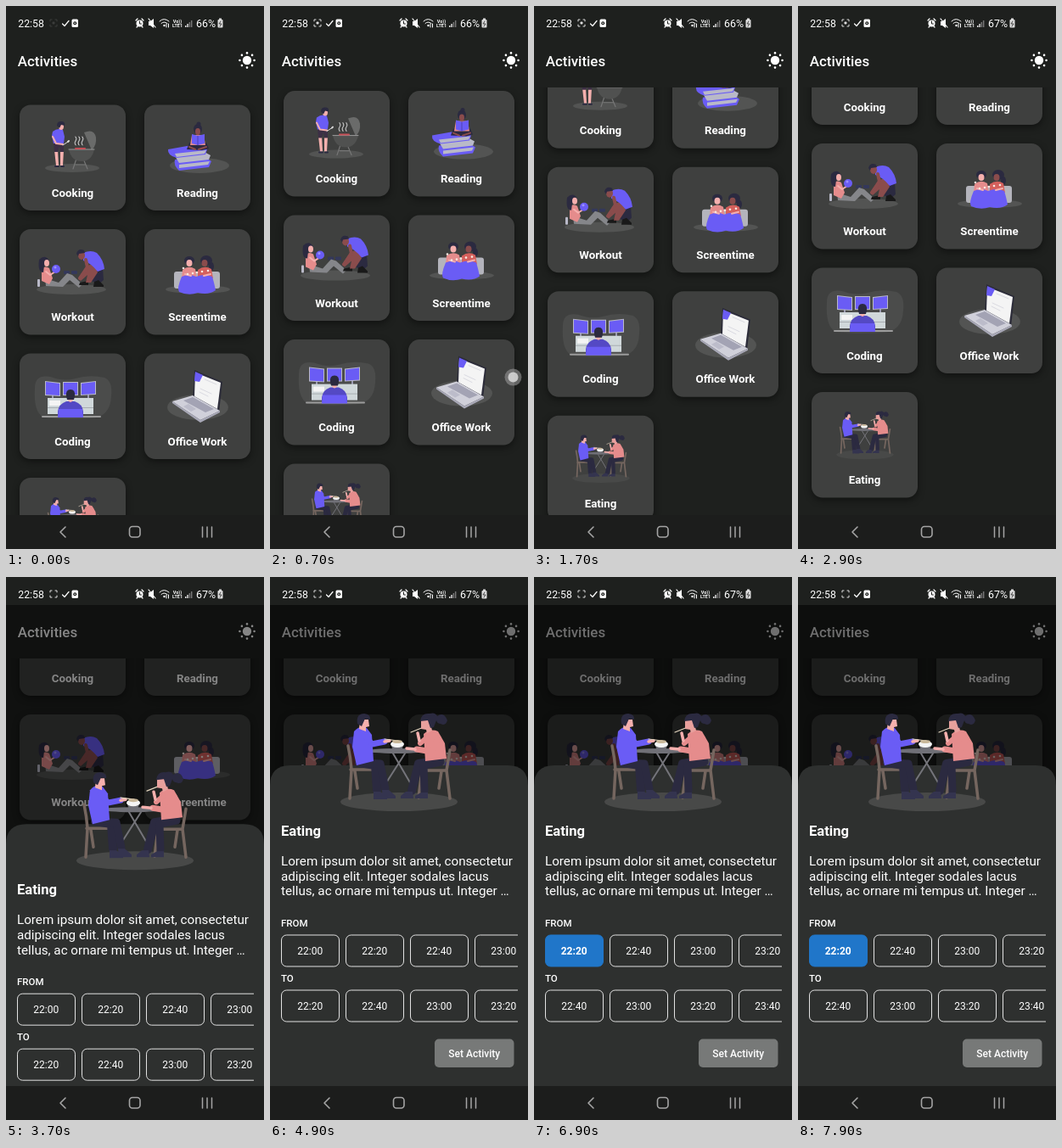
Animation of 304x640 px, one loop 8000 ms. Source, as an HTML page:

```html
<!DOCTYPE html>
<html lang="en">
<head>
<meta charset="utf-8">
<title>Activities</title>
<style>
html, body { margin: 0; width: 100%; height: 100%; overflow: hidden; background: #1e201e; }
svg { display: block; width: 100vw; height: 100vh; font-family: Roboto, sans-serif; }
.card { fill: #3f403f; filter: drop-shadow(0 3px 4px rgba(0,0,0,.45)); }
</style>
</head>
<body>
<svg id="stage" viewBox="0 0 304 640"></svg>
<script>
const BLUE = '#6a5cf5', DARK = '#2b2a40', PINK = '#e58c8c', SKIN = '#f5b0ae', BROWN = '#8a4c4c',
  GREY = '#535453', PALE = '#b9b9c8', WHITE = '#f4f4f4';

// Shape helpers
const fill = (c, d) => `<path fill="${c}" d="${d}"/>`;
const line = (c, w, d) => `<path fill="none" stroke="${c}" stroke-width="${w}" stroke-linecap="round" stroke-linejoin="round" d="${d}"/>`;
const oval = (c, x, y, rx, ry = rx) => `<ellipse fill="${c}" cx="${x}" cy="${y}" rx="${rx}" ry="${ry}"/>`;
const box = (c, x, y, w, h, r = 0, more = '') => `<rect fill="${c}" x="${x}" y="${y}" width="${w}" height="${h}" rx="${r}" ${more}/>`;
const text = (s, x, y, size, weight = 400, more = '') =>
  `<text x="${x}" y="${y}" font-size="${size}" font-weight="${weight}" fill="#fff" ${more}>${s}</text>`;
const mid = 'text-anchor="middle"';

const cooking = oval(GREY, 78, 191, 32, 5)
  + fill(SKIN, 'M57 170h4l1 18h-3zM64 170h4l-1 18h-3z') + line(DARK, 2, 'M58 189h4M65 189h3')
  + fill('#3c2f45', 'M56 160h12v12h-4l-1-7-2 7h-4z')
  + fill(BLUE, 'M55 148q6-5 12-2l2 8-1 8H56l-2-9z')
  + line(SKIN, 2, 'M55 154l4 8 8 1') + line('#ddd', 1, 'M67 164l6-4') + line('#ddd', 2, 'M73 160l1-1')
  + oval(SKIN, 65, 142, 3, 4) + fill(DARK, 'M60 141q0-5 5-5 5 0 4 5l-4-1-2 4z')
  + line('#777', 1.2, 'M83 180l-4 12M91 180l5 12M82 187h12')
  + fill('#6a6b6a', 'M92 149q12-5 14 6 1 9-5 15z')
  + fill('#505150', 'M74 169h30q-3 14-15 14t-15-14') + line('#999', 1, 'M74 169h30')
  + line('#c44f56', 2, 'M82 168h11')
  + [82, 86, 90].map(x => line('#ddd', 1, `M${x} 164q-2-3 0-5t0-5`)).join('');

const reading = oval(GREY, 228, 188, 35, 9)
  + fill(BLUE, 'M199 181l34-4 9 6-3 7-35 4q-7-6-5-13')
  + fill(PALE, 'M204 187l36-4-2 4-34 4z')
  + fill(PALE, 'M198 175l32-5 11 6-2 5-35 4z')
  + fill(BLUE, 'M191 169l28-5 18 5-2 6-34 4q-11-3-10-10') + fill(PALE, 'M199 174l37-4-2 4-33 4z')
  + fill(DARK, 'M216 161h20l3 7-8 2-18-1z') + fill(PINK, 'M219 152h14l2 12h-18z')
  + oval(DARK, 226, 145, 5, 6) + oval(DARK, 227, 139, 2.5) + oval(BROWN, 226, 148, 3, 4)
  + fill(BLUE, 'M219 151l7 2 8-2v11l-8 2-7-2z') + line('#3f359c', .7, 'M226 153v11')
  + line(BROWN, 2, 'M216 166l7 3M236 166l-9 3');

const workout = oval(GREY, 77, 334, 41, 6)
  + box(PALE, 37, 322, 3, 9, 1)
  + [[68, 312], [77, 312], [72, 318]].map(([x, y]) => box('#34385a', x, y, 7, 4, 1)).join('')
  + fill('#85868a', 'M46 321l16 5 10-11 6 2 12 11-4 4-11-9-8 8-20-1z')
  + fill(PINK, 'M42 309q5-3 9 0l4 12-4 7-9-4z')
  + fill(DARK, 'M39 299q7-7 12 1l-1 5-5 1-1 8q-7 0-5-15') + oval(SKIN, 48, 303, 3, 4)
  + line(SKIN, 2, 'M47 313l5 4 6-4') + oval(BLUE, 59, 310, 5) + oval('#9b90ff', 58, 308, 1.5)
  + fill(DARK, 'M102 308l12 1 1 14-6 5-8-4z')
  + fill('#191919', 'M87 326l10-2v5H86zM104 325l5-2 6 6v2h-12z')
  + fill(BROWN, 'M94 307l10-4 4 11-8 12h-6l2-9-8 7-3-3z')
  + fill(BLUE, 'M91 291q9-4 16 0 8 8 9 19l-8 3q-8-10-17-13z')
  + line(BROWN, 4, 'M94 299l2 9-9 13') + oval(BROWN, 89, 294, 4, 5)
  + fill(DARK, 'M83 292q2-7 9-4l1 3-7 1-1 3z');

const screentime = oval(GREY, 226, 334, 38, 5)
  + box('#b4b4bc', 198, 313, 54, 20, 3)
  + oval(DARK, 216, 300, 6, 5) + oval(DARK, 236, 300, 7, 6) + oval(DARK, 242, 307, 3, 5)
  + oval(SKIN, 216, 303, 3.5, 4) + oval(BROWN, 234, 303, 3.5, 4)
  + fill(PINK, 'M208 311q7-6 15-1l2 11h-18z') + fill('#d4605c', 'M226 311q8-6 16-1l2 11h-18z')
  + fill(BLUE, 'M207 319q9-4 17 0 10-4 19 0 2 6 4 16-8 6-21 3-11 4-22-1-3-4 3-18')
  + line(SKIN, 2, 'M211 316l7 2M241 316l-8 2')
  + [209, 214, 220, 225, 231, 238].map((x, i) => oval('#f7e7e0', x, 309 + i * 7 % 8, 1.3)).join('');

const coding = fill('#4b4c4b', 'M34 450q0-16 18-13 16 6 30 2 16-5 34-1 10 4 8 22-1 25-25 26-32 2-55-1-12-7-10-35')
  + [46, 67, 88].map((x, i) => {
    const tilt = 1 - i;
    return line('#9a9ab0', 2, `M${x + 9} 458v6`)
      + fill(PALE, `M${x} ${443 - tilt}l18 ${tilt * 2}v16l-18 ${-tilt}z`)
      + fill(BLUE, `M${x + 1} ${444 - tilt}l16 ${tilt * 2}v14l-16 ${-tilt}z`);
  }).join('')
  + box('#d0d8da', 49, 462, 54, 19) + box('#a8adb2', 49, 473, 54, 1) + box(WHITE, 51, 465, 13, 6)
  + line('#9b9b9b', 2, 'M43 484h68')
  + fill('#5449c4', 'M61 478q1-9 10-12h10q9 3 10 12v5H61z')
  + oval(SKIN, 76, 462, 3.5, 5) + fill(DARK, 'M71 460q-1-8 5-8t5 8l-1 4h-8z')
  + fill(BLUE, 'M62 475h28l1 10H61z');

const office = oval(GREY, 226, 473, 36, 15)
  + fill('#2c2c39', 'M222 429l33 14-4 36-31-18z') + fill(WHITE, 'M223 432l30 12-4 31-27-15z')
  + fill(BLUE, 'M223 431l9 4-4 8-6-1z') + line('#d4d4dc', .8, 'M234 440l14 6M229 451l13 6M228 455l10 5')
  + fill('#d0d0da', 'M196 466l24-7 32 18-23 11z') + fill('#a9a9b8', 'M196 466l33 22 23-11v2l-23 12-33-23z')
  + fill('#a3a3b4', 'M209 465l11-4 25 14-10 4z') + fill('#bcbcca', 'M209 472l6-3 9 6-6 3z');

const chair = d => line('#75665f', 3.5, d);
const eating = oval('#484948', 152, 265, 69, 11)
  + chair('M92 199q3 14 4 28l-2 34M95 227h29l3 33M100 229l3 20')
  + chair('M212 204l-4 24 4 33M207 228h-28l-4 32M202 229l-3 20')
  + line('#74747a', 2, 'M145 208l21 36M159 208l-23 36')
  + oval('#707077', 149, 205, 36, 3)
  + line(DARK, 10, 'M105 219l19 3 2 29') + line(DARK, 9, 'M106 219l24 1 6 30')
  + line(DARK, 10, 'M200 216l-25 4-8 32') + line(DARK, 9, 'M201 218l-20 4 1 30')
  + fill('#34344f', 'M132 251h8l8 7v3h-15zM122 253h8l8 6v3h-16zM160 253h8l1 8h-15v-3zM178 254h8v7h-15v-3z')
  + fill(BLUE, 'M99 182q7-8 15-4l6 8 2 31-20 5-5-22z')
  + line(BLUE, 7, 'M111 186l9 11 15-3') + line(SKIN, 3.5, 'M135 194l6-1') + line('#e5d7c0', 1.2, 'M135 191l16 2')
  + fill(SKIN, 'M106 168h10l1 8-4 1v5l-8-3z')
  + fill(DARK, 'M103 173q-2-12 8-12 8 1 7 7l-6-1-4 9z')
  + fill('#707077', 'M143 199h14l-2 5h-10z') + oval(WHITE, 150, 197, 8, 4) + oval('#c9b89a', 150, 194, 6, 2)
  + fill(PINK, 'M181 185q8-7 17-3l8 14 2 18-25 3z')
  + line(PINK, 7, 'M198 190l-7 16-18-3') + line(PINK, 6, 'M185 189l-8 7')
  + line(SKIN, 3.5, 'M171 203l-10-1M176 193l-2-9') + line('#e5d7c0', 1.2, 'M166 183l15-6')
  + fill('#e8a09d', 'M178 167h10l3 14-6 3-1-4-6-1z')
  + fill(DARK, 'M177 170q1-10 11-9 7-2 9 3 8-6 12 5-2 7-8 4-4 0-5-4l-3 8-4 1-3-9z');

const activities = [
  ['Cooking', cooking], ['Reading', reading], ['Workout', workout], ['Screentime', screentime],
  ['Coding', coding], ['Office Work', office],
  ['Eating', `<g transform="translate(4.5 500) scale(.49)">${eating}</g>`],
];
const cards = activities.map(([name, art], i) => {
  const x = 16 + i % 2 * 147, y = 116.5 + (i >> 1) * 146.5;
  return `<rect class="card" x="${x}" y="${y}" width="125" height="124.5" rx="13"/>` + art
    + text(name, x + 62.5, y + 108, 13.3, 700, mid);
}).join('');

const sun = oval('#fff', 284, 64, 5.2) + [...Array(8)].map((_, i) => {
  const a = i * Math.PI / 4;
  return oval('#fff', 284 + 8.6 * Math.cos(a), 64 + 8.6 * Math.sin(a), 1.3);
}).join('');

const status = text('22:58', 14.3, 25, 12.3)
  + `<g id="scan">${line('#ddd', 1, 'M52 18v-2h2M58 16h2v2M60 22v2h-2M54 24h-2v-2')}<g id="lens">${box('#ddd', 54.5, 18.5, 3, 3, 1)}</g></g>`
  + line('#fff', 1.2, 'M66.5 21l2.5 2.500 5-6')
  + box('#fff', 77.5, 15.5, 7.5, 9.5, 1.5) + oval('#1e201e', 81.2, 20.2, 2) + oval('#fff', 81.2, 20.2, .8)
  + oval('#fff', 157.5, 20.5, 4) + line('#1e201e', 1, 'M157.5 18v3h2') + line('#fff', 1.2, 'M153 17l2-2M162 17l-2-2M154 25l1-1M161 25l-1-1')
  + fill('#fff', 'M168 18h2l4-3v11l-4-3h-2z') + line('#fff', 1.2, 'M168 15l8 10')
  + line('#fff', 1, 'M181 18q5-5 11 0M183 20.5q3-3 7 0M189 25v-4M191.5 21v4') + oval('#fff', 186.5, 23, 1.2)
  + text('Vo))', 202, 19.5, 5.5, 700, mid) + text('LTE1', 202, 25, 5.5, 700, mid)
  + [0, 1, 2, 3].map(i => box(i < 2 ? '#ddd' : '#777', 211 + i * 2.3, 23 - i * 2, 1.5, 2 + i * 2)).join('')
  + text('66%', 224, 25, 12.4, 400, 'id="charge"')
  + box('#ddd', 249.5, 16, 6, 9.5, 1) + box('#ddd', 251, 14.5, 3, 2) + line('#333', .9, 'M253 18l-2 3h3l-2 3');

const nav = box('#1c1d1c', 0, 600, 304, 40) + line('#a5a5a5', 1.6, 'M70 614l-6 6 6 6')
  + box('none', 145.5, 613.5, 12.5, 12.5, 3.5, 'stroke="#a5a5a5" stroke-width="1.6"')
  + line('#a5a5a5', 1.5, 'M231.5 614v12M237 614v12M242.5 614v12');

// A row of time slots, 20 minutes apart
const slots = (y, start, chosen) => [...Array(6)].map((_, i) => {
  const m = start + i * 20, x = 13.5 + i * 76, on = m === chosen;
  const label = String(Math.floor(m / 60) % 24).padStart(2, '0') + ':' + String(m % 60).padStart(2, '0');
  return box(on ? '#2076c9' : 'none', x, y, 68, 37, 6, `stroke="${on ? '#2076c9' : '#e2e2e2'}"`)
    + text(label, x + 33.7, y + 23, 12, on ? 700 : 400, mid);
}).join('');

const lorem = ['Lorem ipsum dolor sit amet, consectetur', 'adipiscing elit. Integer sodales lacus', 'tellus, ac ornare mi tempus ut. Integer …'];
const sheet = fill('#2e302f', 'M0 600V246q0-24 24-24h256q24 0 24 24v354z') + eating
  + text('Eating', 13, 305.2, 16.6, 700)
  + lorem.map((s, i) => text(s, 13, 340 + i * 17.7, 15.2)).join('')
  + text('FROM', 13, 412, 11.5, 500) + text('TO', 13, 477, 11.5, 500)
  + `<g clip-path="url(#row)"><g id="from"></g><g id="to"></g></g>`
  + box('#777978', 194, 544.5, 93.5, 33.5, 5) + text('Set Activity', 240.7, 565.5, 12, 500, mid);

const clip = (id, x, y, w, h) => `<clipPath id="${id}"><rect x="${x}" y="${y}" width="${w}" height="${h}"/></clipPath>`;
const $ = id => document.getElementById(id);
$('stage').innerHTML = clip('list', 0, 96, 304, 504) + clip('body', 0, 33, 304, 567) + clip('row', 12, 415, 280, 115)
  + box('#1e201e', 0, 0, 304, 640)
  + `<g clip-path="url(#list)"><g id="cards">${cards}</g></g>`
  + text('Activities', 13.7, 71, 16.9, 500) + sun
  + box('#000', 0, 33, 304, 567, 0, 'id="dim"')
  + `<g clip-path="url(#body)"><g id="sheet">${sheet}</g></g>` + status + nav
  + `<g id="touch">${oval('rgba(150,150,150,.6)', 0, 0, 10)}${oval('rgba(225,225,225,.8)', 0, 0, 6)}</g>`;

const phase = (t, a, b) => Math.min(1, Math.max(0, (t - a) / (b - a)));
const smooth = p => p * p * (3 - 2 * p);
const move = (id, x, y) => $(id).setAttribute('transform', `translate(${x} ${y})`);
const show = (id, v) => $(id).setAttribute('opacity', +v);
let wasChosen;

function draw(now) {
  const t = now % 8000;
  const scroll = 65 * phase(t, 600, 1000) + 7 * phase(t, 1000, 1100) + 29 * smooth(phase(t, 1600, 2400));
  move('cards', 0, -scroll);
  move('touch', 286.5, 454 - scroll);
  show('touch', t >= 600 && t < 1200);

  // The artwork rises above the sheet, so it starts a little lower than the sheet's own height
  move('sheet', 0, 440 * (1 - phase(t, 3450, 3930)) ** 2.5);
  show('dim', .57 * phase(t, 3450, 3750));

  const chosen = t >= 5800;
  if (chosen !== wasChosen) {
    $('from').innerHTML = slots(422, 1320, chosen && 1340);
    $('to').innerHTML = slots(487, chosen ? 1360 : 1340);
    wasChosen = chosen;
  }
  move('from', -76 * smooth(phase(t, 5900, 6500)), 0);

  show('scan', t < 100 ? .15 : 1);
  show('lens', t < 3400);
  $('charge').textContent = t < 2000 ? '66%' : '67%';
  requestAnimationFrame(draw);
}
requestAnimationFrame(draw);
</script>
</body>
</html>
```
